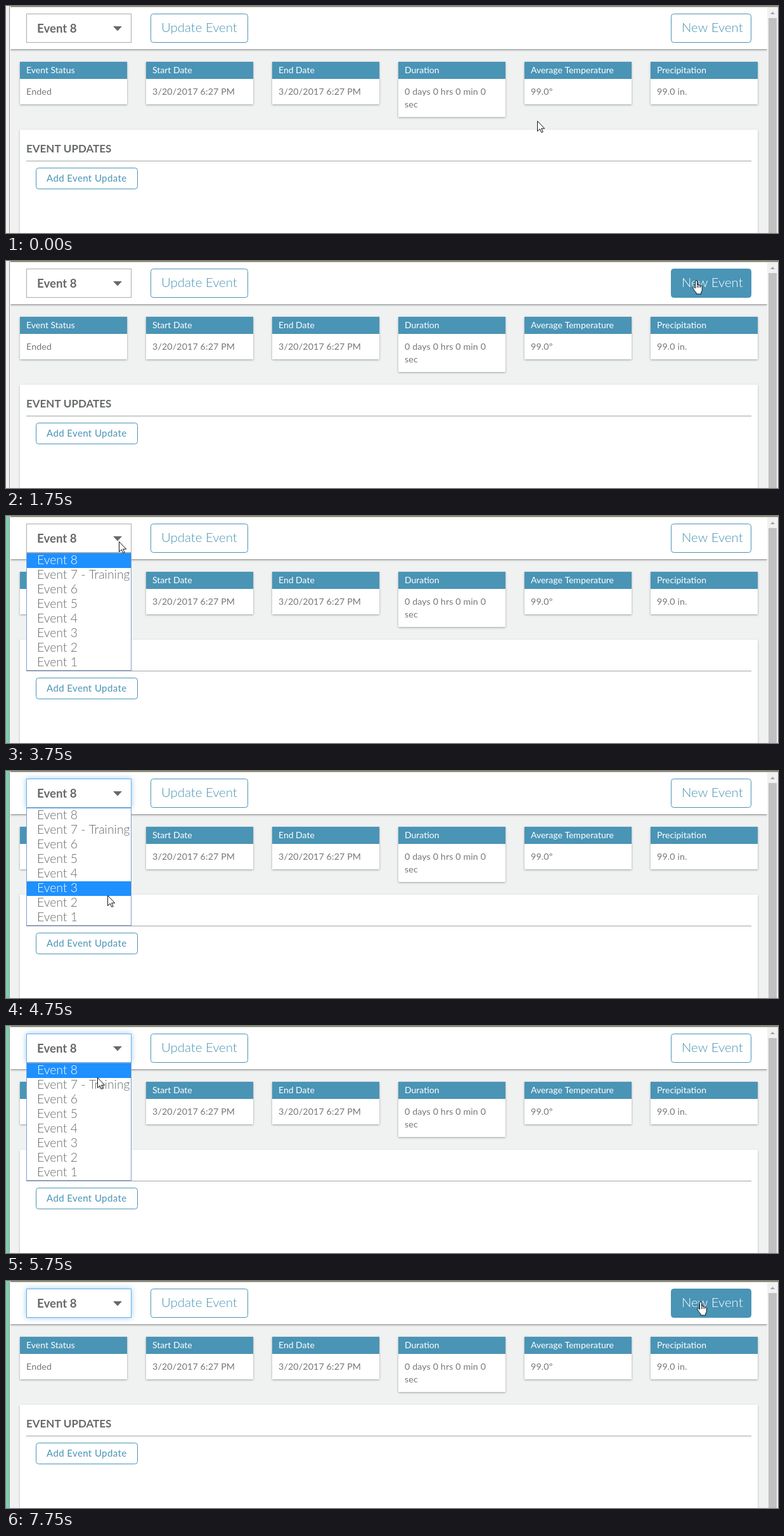
These frames come from a looping animation (1218 px wide and 358 px high, 8 s). An HTML page with a canvas:

```html
<!DOCTYPE html>
<html lang="en">
<head>
<meta charset="utf-8">
<title>Event dashboard</title>
<style>
html, body { margin: 0; width: 100%; height: 100%; overflow: hidden; background: #f0f2f2; }
canvas { display: block; }
</style>
</head>
<body>
<canvas id="stage" width="1218" height="358"></canvas>
<script>
const ctx = document.getElementById('stage').getContext('2d');
const LOOP = 8000, STEP = 250;
const OPEN = 3750, FOCUS = 4000, CLOSE = 6250;
const BLUE = '#4a94b6', GREY = '#66696a', FONT = 'Lato, "Open Sans", sans-serif';

const ARROW = new Path2D('M.5.5V16.5L4.2 13L6.8 18.5L9.2 17.5L6.6 12.2H11.7Z');
const HAND = new Path2D('M4.5 13V2Q4.5.7 6 .7T7.5 2V8Q8 7 9 7.2T10 8.5Q10.6 7.7 11.6 8T12.7 9.5' +
  'Q13.3 8.8 14.3 9.2T15.3 10.8V15Q15.3 17.5 13.8 19V22H6V19.8Q4 18 2.5 15.5L.9 12.8Q.3 11.5 1.3 11T3.2 11.7Z');

const point = (t, x, y) => ({ t, x, y });

// Where the pointer rests or turns
const PATH = [
  point(0, 838, 181),
  point(1750, 1088, 30),
  point(2500, 1088, 30),
  point(3250, 265, 42),
  point(3750, 178, 40),
  point(4750, 160, 196),
  point(5750, 144, 81),
  point(6250, 288, 71),
  point(7750, 1095, 32)
];

const CARDS = [
  ['Event Status', 'Ended'],
  ['Start Date', '3/20/2017 6:27 PM'],
  ['End Date', '3/20/2017 6:27 PM'],
  ['Duration', '0 days 0 hrs 0 min 0', 'sec'],
  ['Average Temperature', '99.0º'],
  ['Precipitation', '99.0 in.']
];
const OPTIONS = Array.from({ length: 8 }, (_, i) => 'Event ' + (8 - i) + (i === 1 ? ' - Training' : ''));

const BUTTONS = [
  { label: 'Update Event', x: 228, y: 12, w: 154, h: 46, size: 20.4, weight: 300 },
  { label: 'New Event', x: 1049, y: 12, w: 127, h: 46, size: 20.4, weight: 300 },
  { label: 'Add Event Update', x: 47, y: 255, w: 161, h: 34, size: 15, weight: 400, gap: .4 }
];

function rect(x, y, w, h, fill) {
  ctx.fillStyle = fill;
  ctx.fillRect(x, y, w, h);
}

function frame(x, y, w, h, color) {
  ctx.strokeStyle = color;
  ctx.lineWidth = 1;
  ctx.strokeRect(x + .5, y + .5, w - 1, h - 1);
}

function raised(x, y, w, h, blur, dy, color) {
  ctx.save();
  ctx.shadowColor = color;
  ctx.shadowBlur = blur;
  ctx.shadowOffsetY = dy;
  rect(x, y, w, h, '#fff');
  ctx.restore();
}

function text(str, x, y, size, color, weight = 400, gap = 0) {
  ctx.font = `${weight} ${size}px ${FONT}`;
  ctx.letterSpacing = gap + 'px';
  ctx.fillStyle = color;
  ctx.fillText(str, x, y);
}

function inside(b, p) {
  return p.x >= b.x && p.x < b.x + b.w && p.y >= b.y && p.y < b.y + b.h;
}

function button(b, hot) {
  ctx.beginPath();
  ctx.roundRect(b.x + .5, b.y + .5, b.w - 1, b.h - 1, 4);
  ctx.fillStyle = hot ? BLUE : '#fff';
  ctx.fill();
  ctx.strokeStyle = BLUE;
  ctx.lineWidth = 1;
  ctx.stroke();
  const base = Math.round(b.y + b.h / 2 + b.size * .3);
  text(b.label, b.x + 17, base, b.size, hot ? '#fff' : BLUE, b.weight, b.gap);
}

function triangle(x, y, w, h, color) {
  ctx.fillStyle = color;
  ctx.beginPath();
  ctx.moveTo(x, y);
  ctx.lineTo(x + w, y);
  ctx.lineTo(x + w / 2, y + h);
  ctx.fill();
}

function card([title, ...lines], i) {
  const x = 22 + 199 * i;
  raised(x, 88, 169, 47 + 20 * lines.length, 3, 1, 'rgba(0,0,0,.35)');
  rect(x, 88, 169, 27, BLUE);
  text(title, x + 10, 106, 14, '#fff');
  lines.forEach((s, n) => text(s, x + 10, 140 + 20 * n, 14.2, '#747778', 400, .15));
}

function page(active) {
  rect(0, 0, 1218, 358, '#f0f2f2');
  raised(22, 195, 1164, 175, 3, 1, 'rgba(0,0,0,.25)');
  text('EVENT UPDATES', 32, 231, 17, GREY, 700);
  rect(32, 244, 1144, 1, '#a0a2a2');
  CARDS.forEach(card);
  raised(7, 0, 1194, 68, 3, 1, 'rgba(0,0,0,.5)');

  // Scrollbar
  rect(1201, 0, 17, 358, '#f1f1f1');
  rect(1203, 19, 13, 339, '#c1c1c1');
  triangle(1206, 13, 7, -4, '#a3a3a3');

  // Window edges
  rect(0, 0, 5, 358, active ? '#7bd0ae' : '#f0f0f0');
  rect(5, 0, 1, 358, '#9b9b9b');
  rect(6, 0, 1, 358, '#f4f4f4');
  rect(7, 0, 1211, 1, '#7f8062');
  rect(7, 1, 1211, 1, '#b4b5a2');
}

function select(focused) {
  raised(32, 12, 166, 46, focused ? 8 : 0, 0, focused ? 'rgba(102,175,233,.7)' : 'transparent');
  frame(32, 12, 166, 46, focused ? '#66afe9' : '#a9abab');
  text('Event 8', 49, 42, 18.7, GREY, 700);
  triangle(169, 32, 14, 7.5, GREY);
}

function list(y) {
  const hot = Math.max(0, Math.min(7, Math.floor((y - 59) / 23)));
  rect(32, 58, 166, 186, '#fff');
  OPTIONS.forEach((s, i) => {
    const top = 59 + 23 * i;
    if (i === hot) rect(33, top, 164, 23, '#1e90ff');
    text(s, 49, top + 17, 19.4, i === hot ? '#fff' : GREY, 300);
  });
  frame(32, 58, 166, 186, '#7b9cd0');
}

function pointer(p, hand) {
  ctx.save();
  ctx.translate(p.x - (hand ? 5 : 0), p.y);
  const shape = hand ? HAND : ARROW;
  ctx.fillStyle = '#fff';
  ctx.fill(shape);
  ctx.strokeStyle = '#111';
  ctx.lineWidth = 1;
  ctx.stroke(shape);
  if (hand) {
    ctx.beginPath();
    for (const x of [7.5, 10, 12.7]) {
      ctx.moveTo(x, 8.5);
      ctx.lineTo(x, 12);
    }
    ctx.stroke();
  }
  ctx.restore();
}

const easeOut = u => 1 - (1 - u) ** 3;

function pointerAt(t) {
  const i = PATH.findLastIndex(p => p.t <= t);
  const a = PATH[i], b = PATH[i + 1] || a;
  const k = a === b ? 0 : easeOut((t - a.t) / (b.t - a.t));
  return { x: Math.round(a.x + (b.x - a.x) * k), y: Math.round(a.y + (b.y - a.y) * k) };
}

function draw(ms) {
  // The screen refreshes four times a second
  const t = Math.floor((ms % LOOP) / STEP) * STEP;
  const p = pointerAt(t);
  page(t >= OPEN);
  select(t >= FOCUS);
  BUTTONS.forEach(b => button(b, inside(b, p)));
  if (t >= OPEN && t < CLOSE) list(p.y);
  pointer(p, BUTTONS.some(b => inside(b, p)));
}

const start = performance.now();
function tick() {
  draw(performance.now() - start);
  requestAnimationFrame(tick);
}
tick();
</script>
</body>
</html>
```
